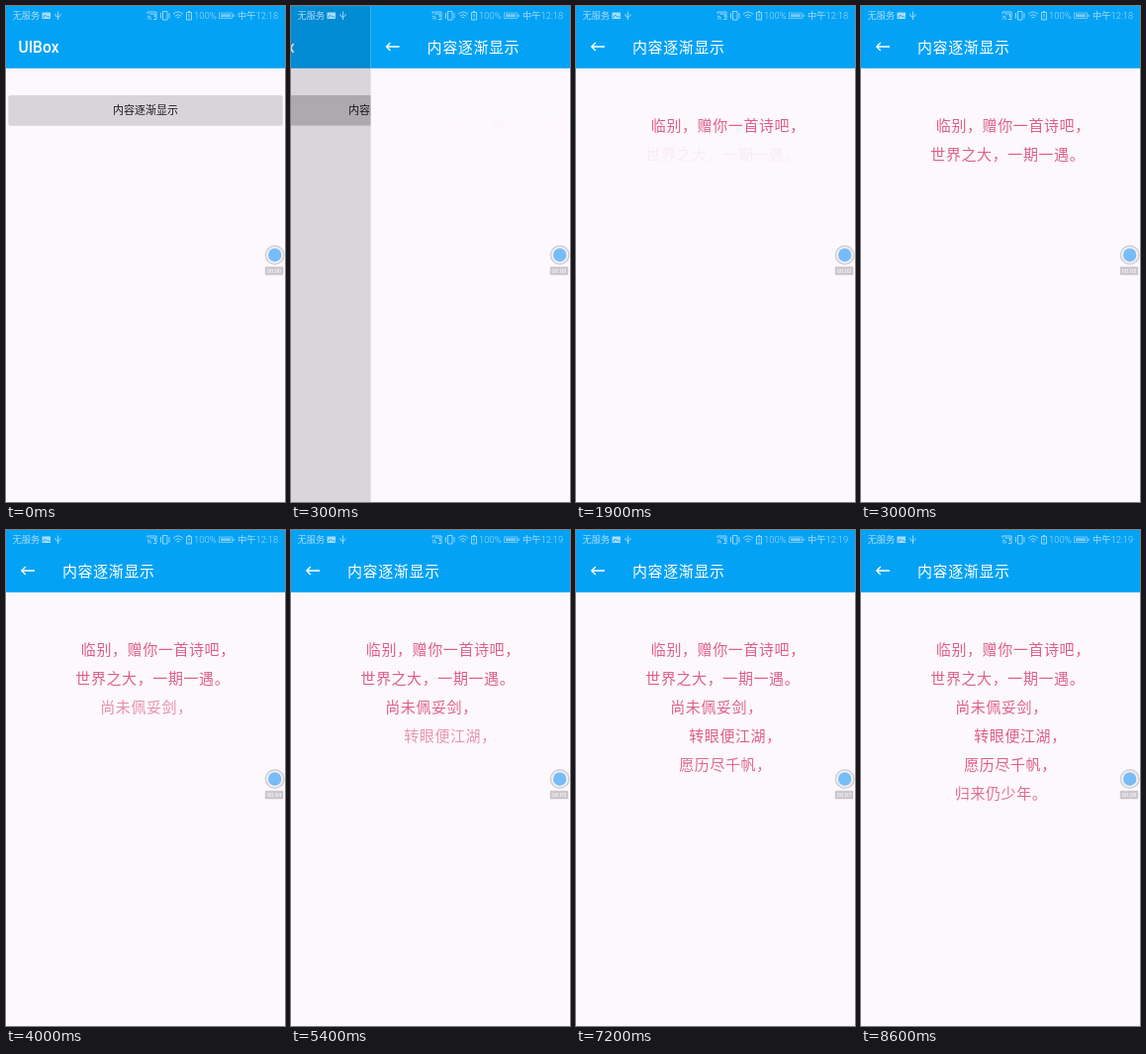
An HTML page that plays this animation: 282x500 px, repeating every 8700 ms.

```html
<!DOCTYPE html>
<html lang="zh-CN">
<head>
<meta charset="utf-8">
<title>内容逐渐显示</title>
<style>
  html, body { margin: 0; width: 100%; height: 100%; overflow: hidden; background: #fdf8fc; }
  svg { display: block; width: 282px; height: 500px; }
  text { font-family: Roboto, "Noto Sans CJK SC", "Noto Sans CJK", sans-serif; }
  .title { font-size: 15.6px; font-weight: 500; fill: #fff; }
  .cjk { font-size: 15px; letter-spacing: .6px; }
  .poem { fill: #de5f89; }
  .status { font-size: 9.3px; font-weight: 300; fill: #a9dcfb; }
  .icons { fill: none; stroke: #a9dcfb; stroke-width: .9; }
  .icons .solid { fill: #a9dcfb; stroke: none; }
</style>
</head>
<body>
<svg viewBox="0 0 282 500">
  <rect width="282" height="500" fill="#fdf8fc"/>

  <g id="home">
    <rect width="282" height="62.8" fill="#03a2f5"/>
    <text class="title" x="12.5" y="47">UIBox</text>
    <rect x="2.5" y="91" width="277" height="30" rx="1.8" fill="#c4c0c5" opacity=".5"/>
    <rect id="button" x="2.5" y="90" width="277" height="30" rx="1.8" fill="#d8d4d8"/>
    <text x="141" y="109" font-size="11" font-weight="500" fill="#1c1b1d" text-anchor="middle">内容逐渐显示</text>
  </g>
  <rect id="dim" width="282" height="500" opacity="0"/>

  <g id="detail">
    <rect width="282" height="500" fill="#fdf8fc"/>
    <rect width="282" height="62.8" fill="#03a2f5"/>
    <path d="M29 41H16M19.800 37L15.800 41L19.800 45" fill="none" stroke="#fff" stroke-width="1.3"/>
    <text class="title cjk" x="57" y="46.500">内容逐渐显示</text>
    <g id="poem"></g>
  </g>

  <text class="status" x="6.5" y="13.2">无服务</text>
  <text class="status" x="190" y="13.2" style="font-size:9.5px">100%</text>
  <text class="status" id="clock" x="234" y="13.2"></text>
  <g class="icons">
    <path class="solid" d="M36.500 6.500h8.500v6.500h-8.500z"/>
    <path d="M37.500 12l2-3l2 2l1-1l2 2" stroke="#03a2f5"/>
    <path d="M52.500 5.500v8.500M50 8v2l2.500 1.500L55 9.500V8"/>
    <path d="M143 8V6h9v7.500H149M143 10a3.500 3.500 0 0 1 3.500 3.500M143 12a1.500 1.500 0 0 1 1.500 1.500M145 8h5.500v3.500"/>
    <path d="M158.500 5.500h4.500v8.500h-4.500zM156.500 7v5.500M165 7v5.500"/>
    <path d="M169 8.200q5-4.500 10 0M170.700 10.200q3.300-3 6.600 0M172.500 12q1.500-1.400 3 0"/>
    <path d="M182.500 6.500h5v7.500h-5zM184 5.500h2M185 8v3M185 12v1"/>
    <g opacity=".7">
      <rect x="215.500" y="7" width="13" height="5.500"/>
      <path class="solid" d="M217 8.300h10v3h-10zM229.300 8.500h1.500v2.500h-1.500z"/>
    </g>
  </g>

  <circle cx="271.700" cy="251" r="9.300" fill="#f3f1f6" stroke="#d0ced5" stroke-width="1.500"/>
  <circle cx="271.700" cy="251" r="6.700" fill="#76bcf7"/>
  <rect x="261.800" y="262.800" width="18.400" height="8.400" rx="1" fill="#cbc6cc"/>
  <text id="timer" x="271" y="269.200" font-size="6" fill="#fff" text-anchor="middle"></text>
</svg>
<script>
const LOOP = 8700;
const FADE_START = 190, FADE_TIME = 1450;
const SLIDE_START = 180, SLIDE_TIME = 260;
const PRESS_AT = 100, MINUTE_AT = 5000;
const LINES = [
  [75.8, '临别，赠你一首诗吧，'],
  [70.3, '世界之大，一期一遇。'],
  [95.2, '尚未佩妥剑，'],
  [114.2, '转眼便江湖，'],
  [104.2, '愿历尽千帆，'],
  [94.8, '归来仍少年。']
];

const byId = id => document.getElementById(id);
const clamp = v => Math.min(1, Math.max(0, v));
const easeInOut = v => (1 - Math.cos(Math.PI * v)) / 2;
const easeOut = v => 1 - (1 - v) ** 2;

const lines = LINES.map(([x, words], i) => {
  const line = document.createElementNS('http://www.w3.org/2000/svg', 'text');
  line.setAttribute('class', 'poem cjk');
  line.setAttribute('x', x);
  line.setAttribute('y', 126.4 + i * 28.9);
  line.textContent = words;
  byId('poem').append(line);
  return line;
});

function render(t) {
  const slide = easeOut(clamp((t - SLIDE_START) / SLIDE_TIME));
  byId('home').setAttribute('transform', `translate(${-70 * slide})`);
  byId('detail').setAttribute('transform', `translate(${282 * (1 - slide)})`);
  byId('dim').setAttribute('opacity', slide * 0.2);
  byId('button').setAttribute('fill', t < PRESS_AT ? '#d8d4d8' : '#c9c5c9');

  lines.forEach((line, i) => {
    const progress = clamp((t - FADE_START) / FADE_TIME - i);
    line.setAttribute('opacity', easeInOut(progress));
  });

  byId('clock').textContent = t < MINUTE_AT ? '中午12:18' : '中午12:19';
  byId('timer').textContent = '00:0' + Math.floor((t + 150) / 1000);
}

function tick() {
  render(performance.now() % LOOP);
  requestAnimationFrame(tick);
}
tick();
</script>
</body>
</html>
```
